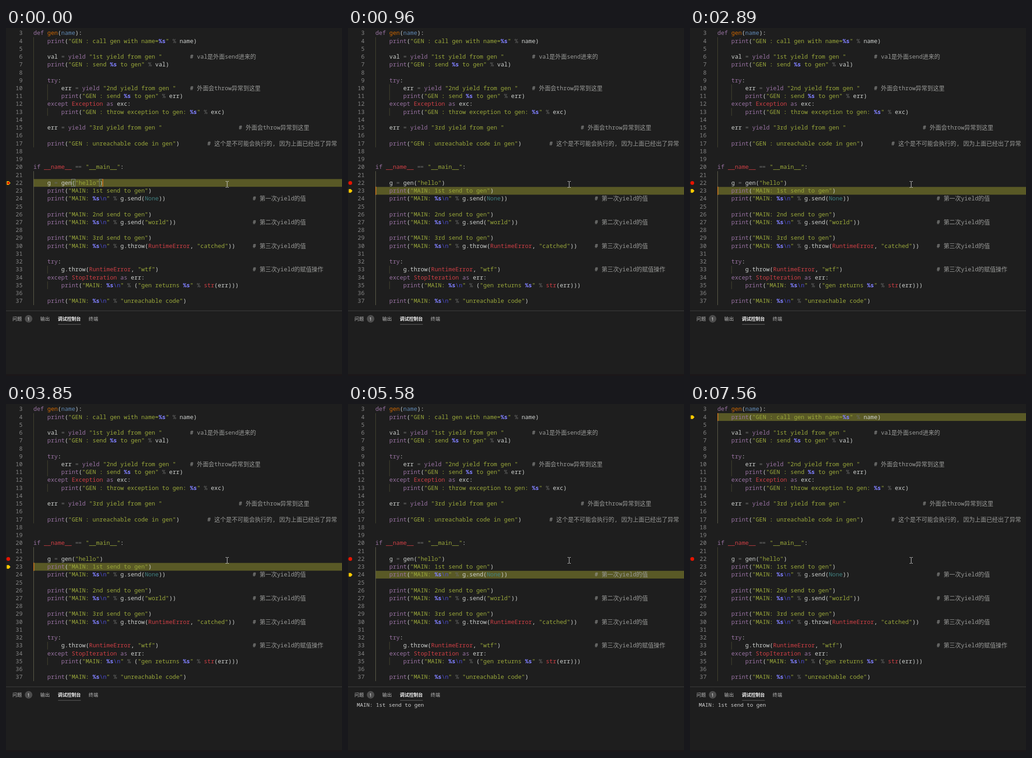
These frames come from a looping animation (736x761 px, 7.99 s). An HTML page:

```html
<!DOCTYPE html>
<html lang="zh-CN">
<head>
<meta charset="utf-8">
<title>Generator debugging</title>
<style>
html, body { margin: 0; width: 100%; height: 100%; overflow: hidden; background: #1e1e1e; }
svg { display: block; }
text { white-space: pre; }
.code { font: 500 12.7px "Noto Sans Mono", "Noto Sans CJK SC", "Noto Sans CJK", monospace; fill: #cdd0ce; }
.num { font-weight: 400; fill: #858585; text-anchor: end; }
.kw { fill: #9872a2; }
.fn { fill: #ce6700; }
.arg { fill: #6089b4; }
.str { fill: #9aa83a; }
.fmt { fill: #8080ff; font-weight: 600; }
.esc { fill: #4c4cd0; }
.op { fill: #676867; font-weight: 400; }
.pair { fill: #676867; letter-spacing: -1px; }
.type { fill: #cf3f45; }
.const { fill: #408080; }
.note { fill: #9a9b99; font-weight: 400; }
.cjk { font-weight: 300; }
.tab { font: 500 10.4px "Noto Sans CJK SC", "Noto Sans CJK", sans-serif; fill: #b8b8b8; }
.active { font-weight: 700; font-size: 10.1px; fill: #f4f4f4; }
.badge { font: 500 9.5px "Open Sans", sans-serif; fill: #fff; text-anchor: middle; }
.out { font: 500 11.67px "Noto Sans Mono", monospace; fill: #d0d0d0; }
</style>
</head>
<body>
<svg id="stage" width="736" height="761" viewBox="0 0 736 761"></svg>
<script>
const FIRST = 3, LEFT = 60.1, CHAR = 7.62, ROW = 17.235;

const source = String.raw`def gen(name):
    print("GEN : call gen with name=%s" % name)

    val = yield "1st yield from gen "
    print("GEN : send %s to gen" % val)

    try:
        err = yield "2nd yield from gen "
        print("GEN : send %s to gen" % err)
    except Exception as exc:
        print("GEN : throw exception to gen: %s" % exc)

    err = yield "3rd yield from gen "

    print("GEN : unreachable code in gen")


if __name__ == "__main__":

    g = gen("hello")
    print("MAIN: 1st send to gen")
    print("MAIN: %s\n" % g.send(None))

    print("MAIN: 2nd send to gen")
    print("MAIN: %s\n" % g.send("world"))

    print("MAIN: 3rd send to gen")
    print("MAIN: %s\n" % g.throw(RuntimeError, "catched"))

    try:
        g.throw(RuntimeError, "wtf")
    except StopIteration as err:
        print("MAIN: %s\n" % ("gen returns %s" % str(err)))

    print("MAIN: %s\n" % "unreachable code")`.split("\n");

// line: [column, comment]
const notes = {
  6: [45, "# val是外面send进来的"],
  10: [45, "# 外面会throw异常到这里"],
  15: [59, "# 外面会throw异常到这里"],
  17: [50, "# 这个是不可能会执行的, 因为上面已经出了异常"],
  24: [63, "# 第一次yield的值"],
  27: [63, "# 第二次yield的值"],
  30: [63, "# 第三次yield的值"],
  33: [63, "# 第三次yield的赋值操作"]
};

// [start ms, current line, caret visible]
const steps = [
  [0, 22, 1], [280, 22, 0], [680, 22, 1],
  [960, 23, 1], [1400, 23, 0], [1960, 23, 1], [2360, 23, 0],
  [2890, 23, 1], [3450, 23, 0], [3850, 23, 1],
  [4130, 24, 1], [4560, 24, 0], [5020, 24, 1], [5580, 24, 0],
  [6010, 24, 1], [6570, 24, 0], [7000, 24, 1],
  [7560, 4, 1]
];
const LOOP = 7990, BREAKPOINT = 22;

const stage = document.getElementById("stage");
const rowY = line => 330.3 + (line - 22) * ROW;
const edge = line => Math.round(rowY(line) - 0.1);
const colX = col => LEFT + col * CHAR;

function add(tag, attrs, content, parent = stage) {
  const el = document.createElementNS("http://www.w3.org/2000/svg", tag);
  for (const key in attrs) el.setAttribute(key, attrs[key]);
  if (content !== undefined) el.textContent = content;
  parent.append(el);
  return el;
}
const rect = (x, y, width, height, fill) => add("rect", { x, y, width, height, fill });
const show = (el, on) => el.setAttribute("visibility", on ? "visible" : "hidden");

const rules = [
  ["str", /"[^"]*"/],
  ["fn", /(?<=def )\w+/],
  ["arg", /(?<=gen\()name/],
  ["kw", /\b(?:def|yield|try|except|as|if|print)\b/],
  ["type", /\b(?:Exception|RuntimeError|StopIteration|str|__name__)\b/],
  ["const", /\bNone\b/],
  ["pair", /==/],
  ["op", /[=%]/],
  ["plain", /[^\s"=%\w]+|\w+/]
];
const lexer = new RegExp(rules.map(([name, re]) => `(?<${name}>${re.source})`).join("|"), "g");

function drawLine(code, line) {
  const y = Math.round(rowY(line) + 12.5);
  const put = (kind, col, text) => add("text", { class: "code " + kind, x: colX(col), y }, text);
  add("text", { class: "code num", x: 36.3, y }, line);
  for (const match of code.matchAll(lexer)) {
    const kind = Object.keys(match.groups).find(key => match.groups[key] !== undefined);
    if (kind !== "str") { put(kind, match.index, match[0]); continue; }
    let col = match.index;
    for (const part of match[0].split(/(%s|\\n)/)) {
      put(part === "%s" ? "fmt" : part === "\\n" ? "esc" : "str", col, part);
      col += part.length;
    }
  }
  if (notes[line]) {
    const [col, text] = notes[line];
    const el = put("note", col, "");
    for (const part of text.split(/([\u4e00-\u9fff]+)/))
      add("tspan", /[\u4e00-\u9fff]/.test(part) ? { class: "cjk" } : {}, part, el);
  }
}

const guide = (col, from, to) =>
  rect(colX(col), edge(from), 0.87, edge(to + 1) - edge(from), "#505037");

// Editor
const bar = rect(60, 0, 676, ROW - 0.3, "#595926");
const genGuide = guide(0, 4, 17), mainGuide = guide(0, 21, 37);
[[10, 11], [13, 13], [33, 33], [35, 35]].forEach(([a, b]) => guide(4, a, b));

const brackets = [11, 19].map(col => add("rect", {
  x: Math.round(colX(col)) - 0.5, y: 330.5, width: 8, height: 16,
  fill: "#006400", "fill-opacity": 0.1, stroke: "#888"
}));
source.forEach((code, i) => drawLine(code, i + FIRST));
const caret = rect(60, 0, 2, 17, "#c07020");

// Gutter
const dot = add("circle", { cx: 5, cy: 338.9, r: 4.1, fill: "#e51400" });
const arrow = add("path", {
  d: "M2.5-4H6.2L9.8 0 6.2 4H2.5Q1.6 4 1.6 3.1V-3.1Q1.6-4 2.5-4Z", fill: "#ffcc00"
});
const core = add("circle", { cx: 5.2, cy: 338.9, r: 2.6, fill: "#e51400" });

// Panel
rect(0, 618, 736, 1, "#414141");
const tab = (x, text, active = "") => add("text", { class: "tab " + active, x, y: 639.8 }, text);
tab(14, "问题");
tab(75, "输出");
tab(113.5, "调试控制台", "active");
tab(181, "终端");
add("circle", { cx: 49.5, cy: 636, r: 8.2, fill: "#4d4d4d" });
add("text", { class: "badge", x: 49.5, y: 639.5 }, "1");
rect(114, 647.6, 50, 1, "#686868");
const output = add("text", { class: "out", x: 19.3, y: 662 }, "MAIN: 1st send to gen");
rect(0, 757, 736, 4, "#1b1719");

// Mouse pointer
add("path", {
  d: "M481 335.5H483.5L484.5 336.5 485.5 335.5H488M484.5 336V348M481 348.5H483.5L484.5 347.5 485.5 348.5H488",
  fill: "none", stroke: "#d8d8d8"
});

function draw(t) {
  const [, line, on] = steps.findLast(step => step[0] <= t);
  const atBreak = line === BREAKPOINT, inGen = line < 18;
  bar.setAttribute("y", rowY(line));
  caret.setAttribute("x", atBreak ? 211 : 60);
  caret.setAttribute("y", edge(line));
  caret.setAttribute("height", edge(line + 1) - edge(line));
  show(caret, on);
  arrow.setAttribute("transform", `translate(0 ${rowY(line) + ROW / 2})`);
  show(dot, !atBreak);
  show(core, atBreak);
  brackets.forEach(el => show(el, atBreak));
  genGuide.setAttribute("fill", inGen ? "#707057" : "#505037");
  mainGuide.setAttribute("fill", inGen ? "#505037" : "#707057");
  show(output, t >= 4130);
}

const start = performance.now();
function tick() {
  draw((performance.now() - start) % LOOP);
  requestAnimationFrame(tick);
}
tick();
</script>
</body>
</html>
```
